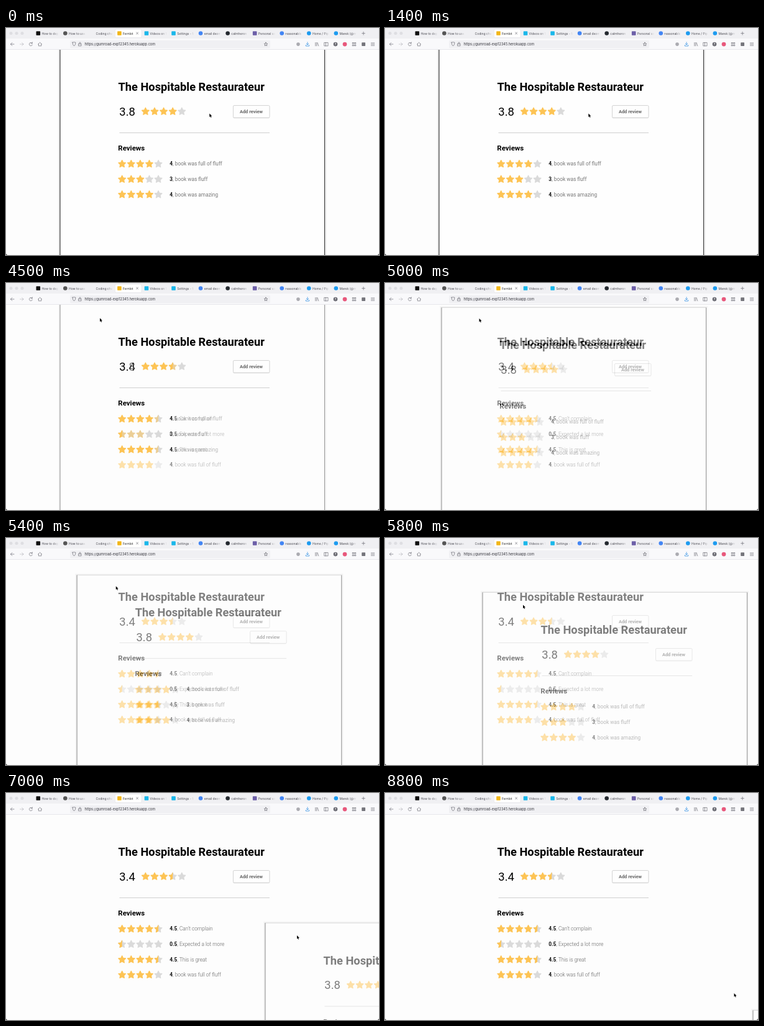
Write an HTML page that moves like this. It is 600 px wide and 365 px high and loops after 8900 ms.

```html
<!DOCTYPE html>
<html lang="en">
<head>
<meta charset="utf-8">
<title>Review page overlay</title>
<style>
  html, body { margin: 0; width: 100%; height: 100%; overflow: hidden; background: #fdfdfd; }
  svg { display: block; width: 100vw; height: 100vh; }
  text { font-family: Roboto, Arial, sans-serif; white-space: pre; }
  .ui text { font-family: Inter, "Open Sans", sans-serif; }
  .line { fill: none; stroke: #6c6c75; stroke-width: .7; stroke-linecap: round; stroke-linejoin: round; }
</style>
</head>
<body>
<svg id="stage" viewBox="0 0 600 365" preserveAspectRatio="none"></svg>
<script>
const LOOP = 8900, STEP = 100;
const GOLD = '#fdc455', GREY = '#dadada';

const rect = (x, y, w, h, fill, extra = '') =>
  `<rect x="${x}" y="${y}" width="${w}" height="${h}" fill="${fill}" ${extra}/>`;
const circle = (x, y, r, fill) => `<circle cx="${x}" cy="${y}" r="${r}" fill="${fill}"/>`;
const text = (x, y, size, fill, str, weight = 400) =>
  `<text x="${x}" y="${y}" font-size="${size}" fill="${fill}" font-weight="${weight}">${str}</text>`;
const line = d => `<path class="line" d="${d}"/>`;

function starPath(outer, inner) {
  const points = Array.from({ length: 10 }, (_, i) => {
    const r = i % 2 ? inner : outer, a = i * Math.PI / 5 - Math.PI / 2;
    return (r * Math.cos(a)).toFixed(2) + ' ' + (r * Math.sin(a)).toFixed(2);
  });
  return 'M' + points.join('L') + 'Z';
}

function stars(x, y, score) {
  let out = '';
  for (let i = 0; i < 5; i++) {
    const part = score - i;
    const use = fill => `<use href="#star" fill="${fill}" stroke="${fill}"/>`;
    const body = part >= 1 ? use(GOLD)
      : use(GREY) + (part > 0 ? `<g clip-path="url(#half)">${use(GOLD)}</g>` : '');
    out += `<g transform="translate(${x + i * 14.6} ${y})">${body}</g>`;
  }
  return out;
}

function page({ score, average, reviews, weight, ink }) {
  let out = text(180.5, 101.2, 18.25, '#000', 'The Hospitable Restaurateur', 700)
    + text(182.3, 140.7, 18.4, '#000', score)
    + stars(224.4, 134.3, average)
    + rect(365.5, 125.2, 58.5, 20, '#000', 'rx="1.5" opacity=".1"')
    + rect(365.5, 124.6, 58.5, 19.6, '#fefefe', 'rx="1.5" stroke="#cecece" stroke-width=".9"')
    + text(375.9, 137.2, 7.45, '#666', 'Add review', 700)
    + rect(182.5, 168, 241.5, 1, '#cfcfcf')
    + text(180.3, 197.2, 11.5, '#000', 'Reviews', 700);
  reviews.forEach(([mark, words], i) => {
    const y = 218.4 + i * 24.6;
    out += stars(186.7, y + .3, mark)
      + `<text x="263.3" y="${y + 2.9}" font-size="8.32" fill="${ink}" font-weight="${weight}">`
      + `<tspan font-weight="700" fill="#111">${mark}</tspan>, ${words}</text>`;
  });
  return out;
}

const TABS = [
  ['How to dep', 's', '#111'], ['How to use', 'c', '#555'], ['Coding cha', '', ''],
  ['Fernlot', 's', '#f2b619'], ['Videos on M', 's', '#1ab7ea'], ['Settings - M', 's', '#1ab7ea'],
  ['email deom', 'c', '#4285f4'], ['calmheron', 'c', '#24292f'], ['Personal sa', 's', '#6c5fa8'],
  ['reasonable', 'c', '#4285f4'], ['Home / Pip', 'c', '#1d9bf0'], ['Marek (@mk', 'c', '#1d9bf0']
];

function browser() {
  let out = rect(0, 0, 600, 17.5, '#f0f0f3')
    + [8, 17, 26].map(x => circle(x, 8.5, 2.5, '#dedee2')).join('')
    + rect(175.5, 2, 42.5, 13.5, '#fff', 'rx="2" stroke="#dcdce0" stroke-width=".5"');
  TABS.forEach(([label, shape, color], i) => {
    const x = 48 + i * 43.55, active = i === 3;
    if (shape === 's') out += rect(x + .5, 5.2, 6.6, 6.6, color, 'rx=".8"');
    if (shape === 'c') out += circle(x + 3.8, 8.5, 3.3, color);
    out += text(x + 9.4, 10.6, 5, active ? '#222' : '#4a4a52', label);
    if (!active) out += rect(x + 27.5, 4, 13, 9, 'url(#fade)');
  });
  return out
    + line('M209.6 7L212.6 10M212.6 7L209.6 10M575 6.2V11M572.6 8.6H577.4')
    + rect(0, 17, 600, 18, '#f9f9fb')
    + rect(0, 34.4, 600, .6, '#dddde1')
    + line('M13 26H7.5M9.8 23.6L7.4 26L9.8 28.4')
    + `<g opacity=".45">${line('M22.5 26H28M25.7 23.6L28.1 26L25.7 28.4')}</g>`
    + line('M42 24.4A2.6 2.6 0 1 0 42.4 27M42.3 22.8V24.8H40.3')
    + line('M51.6 26L54.6 23.2L57.6 26M52.4 25.6V28.8H56.8V25.6')
    + rect(103, 19.8, 322, 12.6, '#f0f0f3', 'rx="2"')
    + line('M107 23.2Q108.5 23.2 109.5 22.6Q110.5 23.2 112 23.2Q112 27.5 109.5 29Q107 27.5 107 23.2Z')
    + line('M117 25.6H121V28.8H117ZM117.7 25.6V24.4A1.3 1.3 0 0 1 120.3 24.4V25.6')
    + text(126.6, 28.1, 5.6, '#33333a', 'https://gumroad-exp12345.herokuapp.com')
    + `<path class="line" transform="translate(418 26.2) scale(.5)" d="${starPath(6, 2.8)}" style="stroke-width:1.5"/>`
    + `<g opacity=".7">${circle(470, 26.1, 2.8, '#8a8a92')}</g>`
    + `<path class="line" d="M485 22.8V26.8M483.2 25.2L485 27L486.8 25.2M482.3 27.5V29H487.7V27.5" style="stroke:#1c84e0"/>`
    + line('M497.8 23.4V28.8M499.8 23.4V28.8M501 23.6L502.8 28.8')
    + line('M512.2 23.4H518V28.8H512.2ZM514.4 23.4V28.8')
    + circle(530, 26.1, 3.3, '#6a6a72') + text(528.5, 28, 5, '#fff', '?', 600)
    + circle(545, 26.1, 3.4, '#e8587c')
    + line('M557.6 23.5H559.3V25.2H557.6ZM561 23.5H562.7V25.2H561ZM557.6 27H559.3V28.7H557.6ZM561 27H562.7V28.7H561Z')
    + rect(572.2, 23.2, 5.8, 5.8, '#74747b', 'rx=".8"')
    + line('M587.3 24H592.7M587.3 26.1H592.7M587.3 28.2H592.7');
}

const before = page({
  score: '3.8', average: 4, weight: 400, ink: '#777',
  reviews: [[4, 'book was full of fluff'], [3, 'book was fluff'], [4, 'book was amazing']]
});
const after = page({
  score: '3.4', average: 3.5, weight: 300, ink: '#606060',
  reviews: [[4.5, 'Can\'t complain'], [0.5, 'Expected a lot more'], [4.5, 'This is great'], [4, 'book was full of fluff']]
});

const shadow = [2, 4, 6].map(w =>
  rect(87, 35, 425.5, 420, 'none', `stroke="#000" stroke-opacity=".05" stroke-width="${w}"`)).join('');

document.getElementById('stage').innerHTML = `
  <defs>
    <path id="star" d="${starPath(6.1, 3.05)}" stroke-width="1.3" stroke-linejoin="round"/>
    <clipPath id="half"><rect x="-8" y="-8" width="8" height="16"/></clipPath>
    <clipPath id="view"><rect y="35" width="600" height="330"/></clipPath>
    <linearGradient id="fade">
      <stop offset="0" stop-color="#f0f0f3" stop-opacity="0"/>
      <stop offset=".7" stop-color="#f0f0f3"/>
    </linearGradient>
  </defs>
  ${rect(0, 0, 600, 365, '#fdfdfd')}
  ${after}
  <g class="ui">${browser()}</g>
  <g clip-path="url(#view)">
    <g id="sheet">
      ${shadow}
      ${rect(87, 34.5, 425.5, 420, '#fefefe')}
      ${rect(87, 34, 425.5, 1, '#bbb')}
      ${rect(86.5, 34.5, 1, 420, '#222')}
      ${rect(512, 34.5, 1, 420, '#333')}
      ${before}
    </g>
  </g>
  <path d="M0 362V365H3Q0 365 0 362ZM600 362V365H597Q600 365 600 362Z" fill="#222"/>
  <path id="cursor" d="M0 0V5.6L1.3 4.4L2.2 6.5L3.2 6.1L2.3 4H4Z" fill="#000" stroke="#fff" stroke-width=".8" paint-order="stroke"/>`;

// Each key: time, x, y
const SHEET_KEYS = [[0, 0, 0], [4800, 0, 0], [5000, 4, 5], [5800, 70, 53], [7000, 330, 174.5], [8400, 505, 315], [LOOP, 505, 315]];
const CURSOR_KEYS = [[0, 327.3, 137.6], [2950, 327.3, 137.6], [3900, 151, 56.6], [4900, 151, 56.6],
  [5000, 151.5, 57], [5800, 222, 107.6], [7000, 468, 229], [8400, 652, 367], [8500, 652, 367], [8800, 561.5, 322], [LOOP, 561.5, 322]];

// Smooth curve through the keys that rests on flat stretches
function track(keys, t, axis) {
  let i = 0;
  while (i < keys.length - 2 && t >= keys[i + 1][0]) i++;
  const rate = n => keys[n + 1] && keys[n]
    ? (keys[n + 1][axis] - keys[n][axis]) / (keys[n + 1][0] - keys[n][0]) : 0;
  const slope = n => rate(n - 1) * rate(n) > 0 ? (rate(n - 1) + rate(n)) / 2 : 0;
  const a = keys[i], b = keys[i + 1], span = b[0] - a[0];
  const u = (t - a[0]) / span, v = 1 - u;
  return v * v * (1 + 2 * u) * a[axis] + u * u * (3 - 2 * u) * b[axis]
    + span * u * v * (v * slope(i) - u * slope(i + 1));
}

function opacity(t) {
  if (t < 300) return 1;
  return t < 1950 ? .75 + .25 * Math.cos((t - 300) / 1100 * 2 * Math.PI) : .5;
}

const sheet = document.getElementById('sheet');
const cursor = document.getElementById('cursor');
const place = (el, keys, t) =>
  el.setAttribute('transform', `translate(${track(keys, t, 1)} ${track(keys, t, 2)})`);

function draw(t) {
  sheet.setAttribute('opacity', opacity(t));
  place(sheet, SHEET_KEYS, t);
  place(cursor, CURSOR_KEYS, t);
}

const start = performance.now();
function tick() {
  const t = (performance.now() - start) % LOOP;
  draw(Math.floor(t / STEP) * STEP);
  requestAnimationFrame(tick);
}
tick();
</script>
</body>
</html>
```
